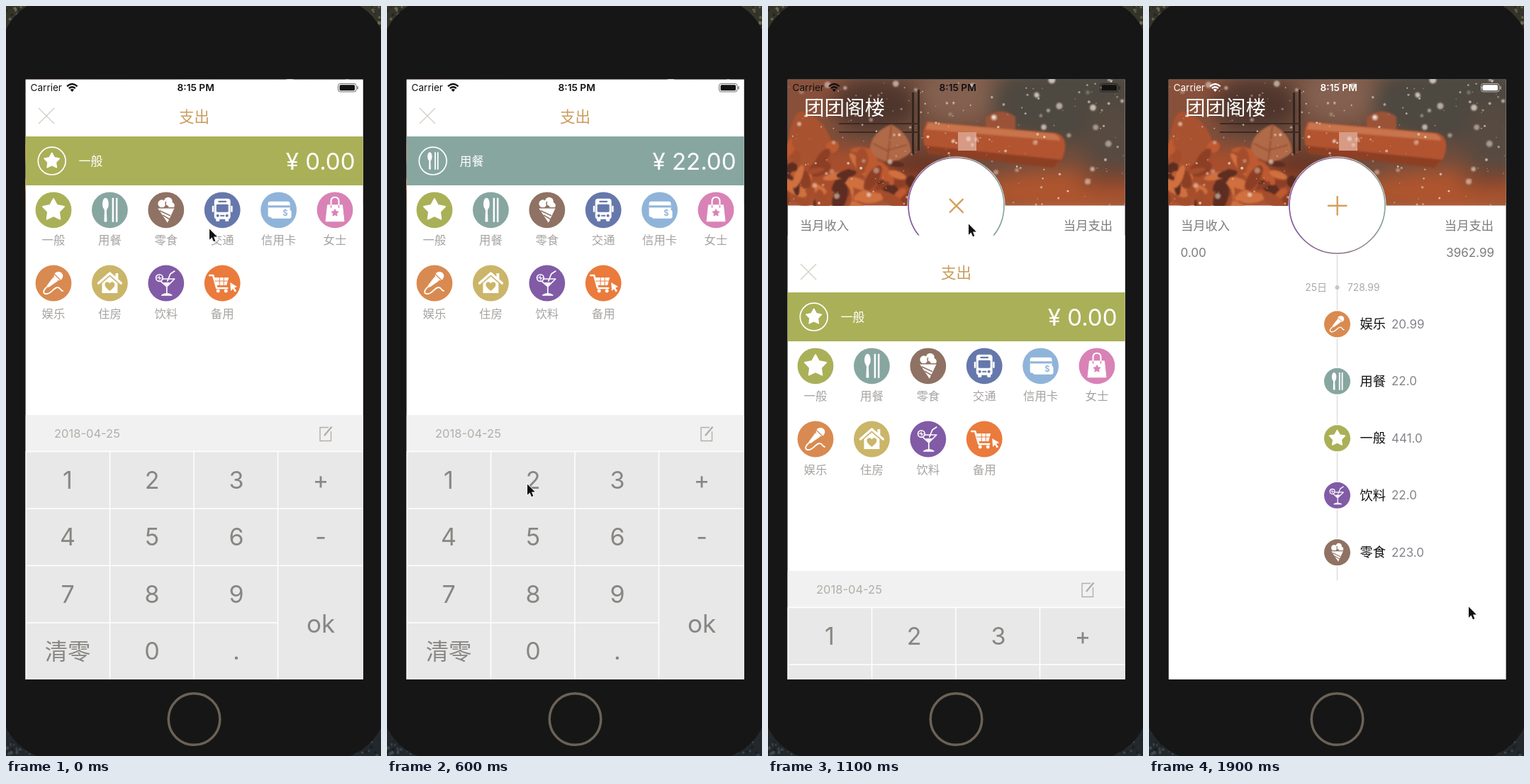
These frames come from a looping animation (529x1058 px, 2000 ms). An HTML page:

```html
<!DOCTYPE html>
<html lang="zh">
<head>
<meta charset="utf-8">
<title>记账</title>
<style>
  html, body { margin: 0; width: 100%; height: 100%; overflow: hidden; background: #161616; }
  svg { display: block; width: 100vw; height: 100vh; }
  text { font-family: Inter, "Noto Sans CJK SC", "Noto Sans CJK", sans-serif; white-space: pre; }
</style>
</head>
<body>
<svg id="stage" viewBox="0 0 529 1058"></svg>
<script>
const LOOP = 2000, STEP = 100, SHEET = 846.5;

// ---------- helpers ----------
const text = (x, y, size, fill, str, anchor = 'start', extra = '') =>
  `<text x="${x}" y="${y}" font-size="${size}" fill="${fill}" text-anchor="${anchor}" ${extra}>${str}</text>`;
const rect = (x, y, w, h, fill, r = 0) =>
  `<rect x="${x}" y="${y}" width="${w}" height="${h}" rx="${r}" fill="${fill}"/>`;
const circle = (x, y, r, fill, extra = '') =>
  `<circle cx="${x}" cy="${y}" r="${r}" fill="${fill}" ${extra}/>`;
const oval = (x, y, rx, ry, fill, turn = 0) =>
  `<ellipse rx="${rx}" ry="${ry}" fill="${fill}" transform="translate(${x} ${y}) rotate(${turn})"/>`;
const line = (d, stroke, w, extra = '') =>
  `<path d="${d}" fill="none" stroke="${stroke}" stroke-width="${w}" ${extra}/>`;
const shape = (d, fill = '#fff', extra = '') => `<path d="${d}" fill="${fill}" ${extra}/>`;
const at = (x, y, s, body) => `<g transform="translate(${x} ${y}) scale(${s})">${body}</g>`;
const ROUND = 'stroke-linecap="round" stroke-linejoin="round"';

function star(r, fill) {
  const pts = Array.from({ length: 10 }, (_, i) => {
    const a = i * Math.PI / 5, q = i % 2 ? r * 0.53 : r;
    return `${(q * Math.sin(a)).toFixed(2)} ${(-q * Math.cos(a)).toFixed(2)}`;
  });
  return shape(`M${pts.join('L')}Z`, fill, `stroke="${fill}" stroke-width="${r / 9}" stroke-linejoin="round"`);
}

function random(seed) {
  return () => (seed = (seed * 16807) % 2147483647) / 2147483647;
}

// ---------- categories: name, colour, icon within a radius of 25.5 ----------
const CATS = [
  ['一般', '#aab057', () => star(16, '#fff')],
  ['用餐', '#88a6a0', () =>
    shape('M-6 -17C-2 -17 -1 -9 -2 -5C-2.600 -2 -4.500 -1 -4.500 1L-4 16Q-6 18 -8 16L-7.500 1C-7.500 -1 -9.400 -2 -10 -5C-11 -9 -10 -17 -6 -17Z') +
    line('M4.500 -17V17M9.800 -17V17', '#fff', 2.5)],
  ['零食', '#8f7263', c =>
    circle(-6, -9, 5.5, '#fff') + circle(3, -12, 6, '#fff') + circle(7.5, -6.5, 4.5, '#fff') +
    shape('M-12 -3L12 -3L2 18Z') +
    line('M-13 -3H13M-9 1L6 8M-5 7L5 13M0 -12Q-2 -9 1 -5', c, 1.5)],
  ['交通', '#6678ab', c =>
    rect(-11.5, -16, 23, 29, '#fff', 4) + rect(-14.5, -6, 2.5, 9, '#fff', 1) + rect(12, -6, 2.5, 9, '#fff', 1) +
    rect(-9, 11, 5, 5, '#fff', 1) + rect(4, 11, 5, 5, '#fff', 1) +
    rect(-6, -13, 12, 2.2, c, 1) + rect(-8.5, -8, 17, 11, c, 1.5) +
    circle(-6.5, 8, 2, c) + circle(6.5, 8, 2, c) + rect(-3, 7, 6, 2, c)],
  ['信用卡', '#90b4d9', c =>
    rect(-15, -12, 31, 22, '#fff', 3) + rect(-15, -6.5, 31, 3, c) + rect(-11, 0, 29, 12, '#fff', 2.5) +
    text(9.5, 8, 11.5, c, '$', 'middle', 'font-weight="600"')],
  ['女士', '#d982b6', c =>
    shape('M-10.500 -7H10.500L13 16H-13Z', '#fff', 'stroke="#fff" stroke-linejoin="round"') +
    line('M-5.500 -3V-12Q-5.500 -18 0 -18Q5.500 -18 5.500 -12V-3', '#fff', 2) +
    line('M-5.500 -7V-3M5.500 -7V-3', c, 1.5) + at(0, 4, 1, star(5.5, c))],
  ['娱乐', '#d98a50', c =>
    circle(7, -10, 6.3, '#fff') + shape('M0 -9L6 -3L-7 6L-9.500 3.500Z') +
    line('M1 -13L11 -3', c, 1.3) +
    line('M-9 5C-16 11 -15 16 -9 15C-2 14 0 6 6 6C10 6 9 10 13 11', '#fff', 1.9, ROUND)],
  ['住房', '#cbb569', c =>
    line('M-16 0L0 -14L16 0', '#fff', 3.5, ROUND) + rect(8, -14, 4, 9, '#fff') +
    shape('M-11 0L0 -9.500L11 0V14H-11Z') +
    shape('M0 11C-5 7 -7 4.500 -7 2C-7 -2 -2 -3 0 0.500C2 -3 7 -2 7 2C7 4.500 5 7 0 11Z', c)],
  ['饮料', '#815ba6', c =>
    line('M-11 -6H12L1 5V16M1 5L-11 -6M-6 17Q1 13 8 17ZM2 -3L6 -13L12 -17', '#fff', 1.7, ROUND) +
    circle(-9.5, -7.5, 4.8, c, 'stroke="#fff" stroke-width="1.700"') +
    line('M-13 -7.500H-6M-9.500 -11V-4M-12 -10L-7 -5', '#fff', 0.9) + shape('M-4 -1H6L1 4Z')],
  ['备用', '#ea7b3c', c =>
    line('M-18 -11H-13L-8 7H7', '#fff', 2.6, ROUND) + shape('M-12 -8H9L6 3H-9Z') +
    line('M-11 -3H9M-4 -8V3M2 -8V3', c, 1) +
    circle(-6, 11, 2.5, '#fff') + circle(5, 11, 2.5, '#fff') +
    shape('M11 -1L21 5L17 6.500L20 11L17.500 12.500L15 8L12 11Z')]
];
const FOOD = 1, SNACK = 2, FUN = 6, DRINK = 8;
const glyph = i => CATS[i][2](CATS[i][1]);
const badge = (i, x, y, r) =>
  circle(x, y, r, CATS[i][1]) + at(x, y, r / 25.5, glyph(i));

// ---------- expense sheet ----------
function sheetArt() {
  const grid = CATS.map((cat, i) => {
    const x = 67 + 79.4 * (i % 6), y = i < 6 ? 287.8 : 391;
    return badge(i, x, y, 25.4) + text(x, y + 48.5, 16.4, '#a6a3a0', cat[0], 'middle');
  }).join('');
  const keys = ['1', '2', '3', '+', '4', '5', '6', '-', '7', '8', '9', '', '清零', '0', '.', '']
    .map((k, i) => k && text(87 + 119 * (i % 4), 681 + 80.4 * (i >> 2), k === '清零' ? 32.3 : 34, '#888683', k, 'middle'))
    .join('');
  return rect(27.5, 103.5, 476.3, SHEET, '#fff') +
    line('M46 144L68 166M68 144L46 166', '#d3ccc4', 1.2) +
    text(265.5, 163.5, 21.5, '#cb9d5f', '支出', 'middle') +
    '<rect id="band" x="27.5" y="184" width="476.3" height="69"/>' +
    circle(64.7, 218.6, 19.4, 'none', 'stroke="#fff" stroke-width="1.700"') +
    '<g id="bandIcon" transform="translate(64.7 218.6) scale(.72)"></g>' +
    text(102.5, 225, 17, '#fff', '', 'start', 'id="bandName"') +
    text(492.5, 230.5, 33, '#fff', '', 'end', 'id="amount"') +
    grid +
    rect(27.5, 577, 476.3, 52, '#f1f1f1') +
    text(68, 608.8, 16.5, '#b2aeaa', '2018-04-25') +
    line('M455 594.500H443V613.500H458.500V600', '#b3aea9', 1.4) +
    line('M449 606L459.500 593.500', '#b3aea9', 2.4) +
    rect(27.5, 629, 476.3, 321, '#e8e8e8') +
    line('M27.500 628.500H504M27.500 709H504M27.500 789.500H504M27.500 870H384M28 628V950M146.500 628V950M265 628V950M383.500 628V950', '#fff', 1.5) +
    keys + text(444, 884, 35, '#888683', 'ok', 'middle');
}

// ---------- home page ----------
function photoArt() {
  const rnd = random(77);
  const tones = ['#bd5a31', '#8d3f25', '#d0703f', '#5c2d20', '#a44d2c'];
  let leaves = '', snow = '', flakes = '';
  for (let i = 0; i < 60; i++) {
    const x = 20 + rnd() * 190, y = 196 + rnd() * 88;
    leaves += oval(x, y, 8 + rnd() * 14, 4 + rnd() * 6, tones[i % 5], rnd() * 180);
  }
  for (let i = 0; i < 190; i++) {
    const x = 28 + rnd() * 476, y = 104 + rnd() * 178, r = 0.6 + 1.6 * rnd() ** 2;
    snow += circle(x, y, r, '#f3e6de', `opacity="${0.3 + rnd() * 0.5}"`);
  }
  for (let i = 0; i < 45; i++) {
    flakes += circle(28 + rnd() * 476, 104 + rnd() * 165, 2 + rnd() * 3, '#efe0d6', `opacity="${0.3 + rnd() * 0.5}"`);
  }
  const haze =
    rect(0, 80, 529, 220, '#704c3c') +
    oval(55, 135, 65, 55, '#88503a') + oval(150, 140, 62, 34, '#4e352c') +
    oval(270, 125, 60, 38, '#83604f') + oval(430, 135, 115, 58, '#4d4840') +
    oval(485, 190, 40, 55, '#574a40') + oval(90, 250, 130, 52, '#a84e2c') +
    oval(420, 262, 125, 32, '#ae552e') + oval(480, 245, 45, 12, '#81452e') + oval(215, 225, 45, 20, '#6b3524');
  return `<g clip-path="url(#photoClip)">` +
    `<g filter="url(#soft)">${haze}</g>` +
    rect(203, 122, 3, 88, '#33251f') + rect(211, 118, 3, 86, '#33251f') +
    line('M100 166H214M100 178H214', '#3b2a23', 2) +
    `<g filter="url(#slight)">` +
    shape('M28 190Q36 142 52 150Q84 162 91 198L60 225H28Z', '#a9522f') + leaves +
    shape('M144 200Q146 178 174 167Q200 180 202 206Q190 218 170 220Q147 215 144 200Z', '#b06a48') +
    line('M174 168L168 222M170 205L148 194M170 203L196 196', '#844229', 1.2) +
    shape('M307 157Q328 141 349 156V178H307Z', '#9a5337') +
    shape('M224 163L406 179Q421 183 419 201Q417 220 402 227L226 208Q213 185 224 163Z', '#b2542f') +
    shape('M226 164L404 180Q412 184 412 190L222 174Z', '#c8744c') +
    shape('M220 197L414 217L402 228L226 208Z', '#8d3f24') + '</g>' +
    rect(268, 178, 26, 26, '#d79a84') +
    `<g filter="url(#slight)">${flakes}</g>` + snow + '</g>';
}

function homeArt() {
  return rect(27.5, 103.5, 476.3, SHEET, '#fff') + photoArt() +
    text(51, 154, 28.5, '#fff', '团团阁楼', 'start', 'font-weight="300"') +
    '<path id="thread" stroke="#dcdcdc" stroke-width="1.4"/>' +
    circle(265.5, 281.5, 69, '#fff') +
    circle(265.5, 281.5, 67.5, '#fff', 'stroke="url(#rim)" stroke-width="1.700"') +
    `<g id="plus">${line('M252 281.800H279.500M265.700 268V295.500', '#d3a05c', 2.4)}</g>` +
    text(45, 316, 17.3, '#7e7b79', '当月收入') + text(486, 316, 17.3, '#7e7b79', '当月支出', 'end') +
    text(44.5, 353.8, 17, '#7e7b79', '0.00') +
    text(487, 353.8, 17, '#7e7b79', '', 'end', 'id="spent"') +
    circle(265.5, 397, 3, '#c6c6c6') +
    text(251, 402, 14, '#aaa', '25日', 'end') +
    text(280, 402, 13.8, '#aaa', '', 'start', 'id="dayTotal"') +
    '<g id="entries"></g>';
}

const statusArt =
  text(34.5, 120, 13.6, 'currentColor', 'Carrier') +
  text(267.7, 120, 13.7, 'currentColor', '8:15 PM', 'middle', 'font-weight="600"') +
  line('M86 113.300Q93.300 106.800 100.600 113.300M88.800 116.200Q93.300 112.300 97.800 116.200', 'currentColor', 2.3) +
  shape('M90.500 118Q93.300 115.800 96.100 118L93.300 121Z', 'currentColor') +
  '<rect x="468.5" y="109.5" width="25.5" height="11.500" rx="3" fill="none" stroke="currentColor" opacity=".6"/>' +
  rect(470.5, 111.3, 21.5, 8, 'currentColor', 1.5) +
  line('M496 113.300V117.500', 'currentColor', 1.5, 'opacity=".6"');

// ---------- stage ----------
function backdrop() {
  const rnd = random(9);
  let out = rect(0, 0, 529, 529, '#34342a') + rect(0, 529, 529, 529, '#23282c');
  for (let i = 0; i < 160; i++) {
    const x = (i % 2 ? 490 : 0) + rnd() * 39, low = i % 4 > 1;
    const fill = low ? ['#46515a', '#191c1e'] : ['#77745a', '#20211a'];
    out += circle(x, low ? 1018 + rnd() * 40 : rnd() * 34, 0.6 + rnd() * 2, fill[i % 3 ? 0 : 1], 'opacity=".7"');
  }
  return out;
}

document.getElementById('stage').innerHTML = `
  <defs>
    <clipPath id="screen"><rect x="27.5" y="103.5" width="476.3" height="846.5"/></clipPath>
    <clipPath id="photoClip"><rect x="27.5" y="103.5" width="476.3" height="178"/></clipPath>
    <filter id="soft" x="-10%" y="-10%" width="120%" height="120%" color-interpolation-filters="sRGB"><feGaussianBlur stdDeviation="13"/></filter>
    <filter id="slight" color-interpolation-filters="sRGB"><feGaussianBlur stdDeviation="1"/></filter>
    <linearGradient id="rim"><stop stop-color="#8159a4"/><stop offset=".6" stop-color="#8d7379"/><stop offset="1" stop-color="#88a6a0"/></linearGradient>
  </defs>
  ${backdrop()}
  ${rect(-8, -12, 545, 1075, '#161616', 80)}
  ${circle(265.5, 1006, 36.3, 'none', 'stroke="#6b6156" stroke-width="3.500"')}
  <g clip-path="url(#screen)">
    <g id="home">${homeArt()}</g>
    <g id="sheet">${sheetArt()}</g>
    <g id="status">${statusArt}</g>
  </g>
  <path id="cursor" d="M0 .5V15.800L3.500 12.500L6 18.300L8.300 17.300L6 11.600H10.800Z" fill="#111" stroke="#fff" stroke-width="1.600" paint-order="stroke"/>`;

// ---------- timeline ----------
const CURSOR = [
  [0, 287, 314], [100, 62, 160], [200, 285, 310], [300, 301, 313], [400, 150, 290],
  [500, 198, 674], [600, 198, 674], [800, 445, 880], [1000, 283, 307], [1100, 283, 307],
  [1200, 70, 392], [1300, 119, 866], [1400, 90, 912], [1500, 205, 680], [1600, 325, 830],
  [1700, 466, 900], [1900, 451, 847]
];
const SLIDE = [[0, 0], [100, 0], [200, SHEET], [300, 5.8], [400, 0], [800, 0], [900, SHEET],
  [1000, SHEET], [1100, 220], [1200, 0], [1700, 0], [1800, 620], [1900, SHEET]];
const TILT = [[0, 0], [900, 0], [1000, 4], [1100, 45], [1200, 0]];
const PICK = [[0, 0], [400, FOOD], [1000, 0], [1200, FUN]];
const AMOUNT = [[0, '0.00'], [500, '2.00'], [600, '22.00'], [1000, '0.00'], [1300, '22.00'],
  [1400, '0.00'], [1500, '20.00'], [1600, '20.90'], [1700, '20.99']];
const LEDGER = [[FUN, '20.99'], [FOOD, '22.0'], [0, '441.0'], [DRINK, '22.0'], [SNACK, '223.0']];
const TOTALS = [[0, 3, '686.0', '2526.0'], [900, 4, '708.0', '3234.0'], [1800, 5, '728.99', '3962.99']];

const held = (keys, t) => keys.filter(k => k[0] <= t).pop();

function mix(keys, t) {
  const a = held(keys, t), b = keys[keys.indexOf(a) + 1];
  if (!b) return a.slice(1);
  const p = (t - a[0]) / (b[0] - a[0]);
  return a.slice(1).map((v, i) => v + (b[i + 1] - v) * p);
}

const el = id => document.getElementById(id);

function draw(t) {
  const [dy] = mix(SLIDE, t), pick = held(PICK, t)[1];
  const [, count, day, month] = held(TOTALS, t);

  el('sheet').setAttribute('transform', `translate(0 ${dy})`);
  el('status').setAttribute('color', dy > SHEET / 2 ? '#fff' : '#111');
  el('cursor').setAttribute('transform', `translate(${mix(CURSOR, t)})`);
  el('plus').setAttribute('transform', `rotate(${mix(TILT, t)[0]} 265.7 281.8)`);

  el('band').setAttribute('fill', pick === FUN ? '#d09057' : CATS[pick][1]);
  el('bandIcon').innerHTML = glyph(pick);
  el('bandName').textContent = CATS[pick][0];
  el('amount').textContent = '¥ ' + held(AMOUNT, t)[1];

  el('spent').textContent = month;
  el('dayTotal').textContent = day;
  el('thread').setAttribute('d', `M265.500 349V${408 + 80.5 * count}`);
  el('entries').innerHTML = LEDGER.slice(-count).map(([cat, sum], i) => {
    const y = 448.8 + 80.5 * i;
    return circle(265.5, y, 20, '#fff') + badge(cat, 265.5, y, 18.5) +
      text(297.5, y + 6.5, 18.2, '#111', CATS[cat][0]) + text(342, y + 6, 17, '#85838a', sum);
  }).join('');
}

let shown = -1;
function tick() {
  const t = Math.floor(performance.now() % LOOP / STEP) * STEP;
  if (t !== shown) draw(shown = t);
  requestAnimationFrame(tick);
}
tick();
</script>
</body>
</html>
```
